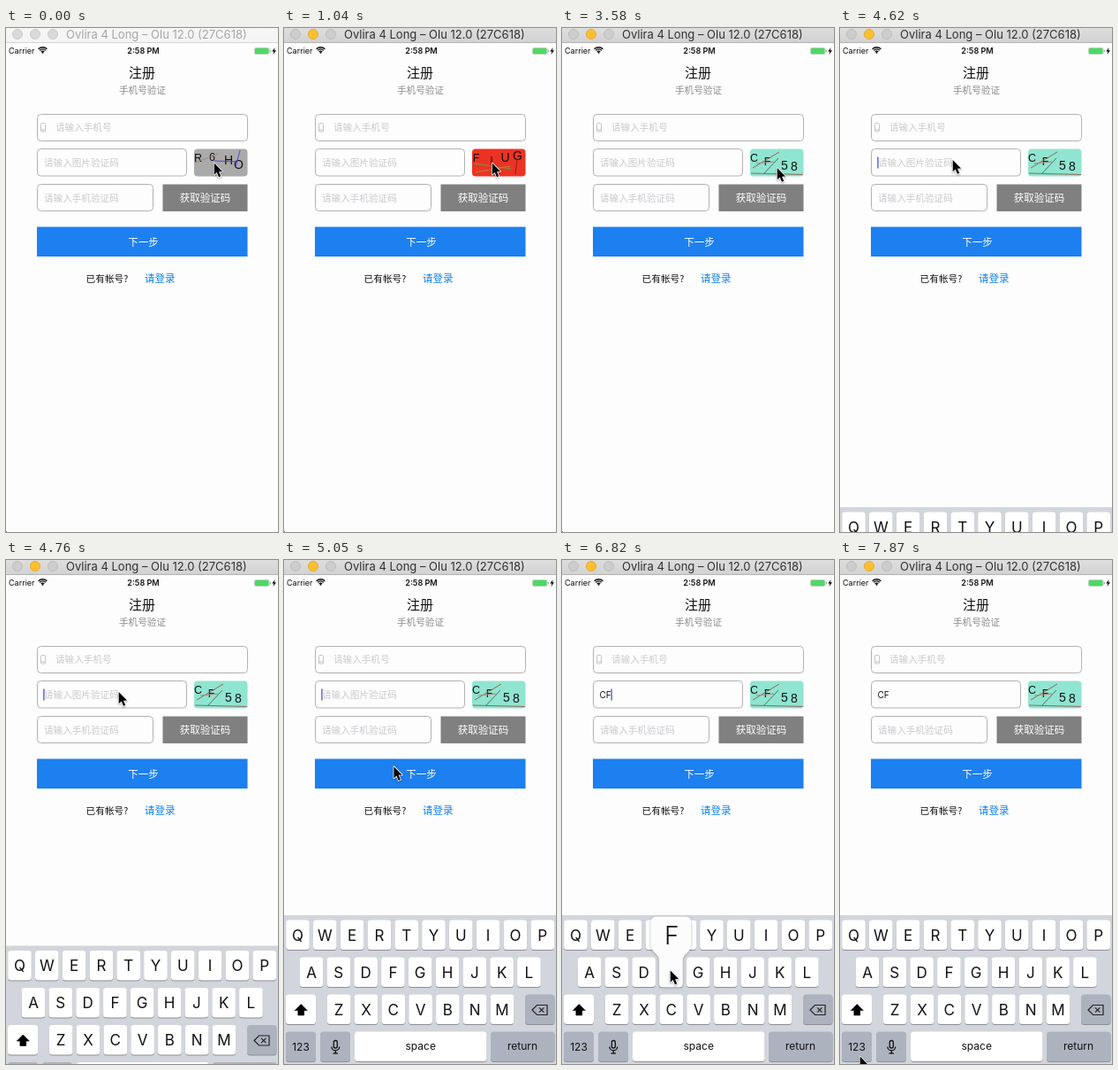
An HTML page with a canvas for the animation above (8 s loop, 308x569 px).

```html
<!DOCTYPE html>
<html lang="zh-CN">
<head>
<meta charset="utf-8">
<title>注册</title>
<style>
html, body { margin: 0; width: 100%; height: 100%; overflow: hidden; background: #fdfdfd; }
canvas { display: block; width: 308px; height: 569px; }
</style>
</head>
<body>
<canvas id="stage"></canvas>
<script>
const W = 308, H = 569, LOOP = 8000;
const LATIN = 'Inter, "Liberation Sans", sans-serif';
const HAN = '"Noto Sans CJK SC", "Noto Sans CJK", sans-serif';
const GLYPH = '"Liberation Sans", Arial, sans-serif';

const canvas = document.getElementById('stage');
const ctx = canvas.getContext('2d');
const dpr = window.devicePixelRatio || 1;
canvas.width = W * dpr;
canvas.height = H * dpr;

// ---------- helpers ----------
function text(str, x, y, size, color, family = LATIN, align = 'left', weight = 400) {
  ctx.font = `${weight} ${size}px ${family}`;
  ctx.textAlign = align;
  ctx.fillStyle = color;
  ctx.fillText(str, x, y);
}

function box(x, y, w, h, r, fill, stroke, width = 1) {
  ctx.beginPath();
  ctx.roundRect(x, y, w, h, r);
  if (fill) { ctx.fillStyle = fill; ctx.fill(); }
  if (stroke) { ctx.strokeStyle = stroke; ctx.lineWidth = width; ctx.stroke(); }
}

function poly(points, fill, stroke, width = 1) {
  ctx.beginPath();
  points.forEach(([x, y]) => ctx.lineTo(x, y));
  ctx.closePath();
  if (stroke) { ctx.strokeStyle = stroke; ctx.lineWidth = width; ctx.stroke(); }
  if (fill) { ctx.fillStyle = fill; ctx.fill(); }
}

function line(x1, y1, x2, y2, color, width = 1) {
  ctx.strokeStyle = color;
  ctx.lineWidth = width;
  ctx.beginPath();
  ctx.moveTo(x1, y1);
  ctx.lineTo(x2, y2);
  ctx.stroke();
}

const within = (t, a, b) => t >= a && t < b;

// ---------- window and status bar ----------
function titleBar(active) {
  const g = ctx.createLinearGradient(0, 0, 0, 16);
  g.addColorStop(0, active ? '#dedede' : '#f6f6f6');
  g.addColorStop(1, active ? '#d2d2d2' : '#f4f4f4');
  ctx.fillStyle = g;
  ctx.fillRect(0, 0, W, 16);
  ctx.fillStyle = active ? '#b4b4b4' : '#d4d4d4';
  ctx.fillRect(0, 16, W, 1);
  [13, 33, 53].forEach((x, i) => {
    const lit = active && i === 1;
    box(x - 5.5, 1.5, 11, 11, 5.5,
      lit ? '#fdbf2f' : active ? '#cdcdcd' : '#d9d9d9',
      lit ? '#e6ac30' : active ? '#bebebe' : '#cccccc');
  });
  text('Ovlira 4 Long – Olu 12.0 (27C618)', 68, 12, 13, active ? '#303030' : '#a6a6a6');
}

function statusBar() {
  text('Carrier', 3, 29, 9, '#111');
  ctx.strokeStyle = '#111';
  ctx.lineWidth = 1.4;
  [2.6, 5, 7.2].forEach(r => {
    ctx.beginPath();
    ctx.arc(41.5, 29, r, -Math.PI * 0.74, -Math.PI * 0.26);
    ctx.stroke();
  });
  box(40.6, 27, 1.8, 1.8, 0.9, '#111');
  text('2:58 PM', 155.5, 29, 9.1, '#111', LATIN, 'center', 600);
  box(281.5, 22.5, 16.5, 7, 1.5, null, '#b9cdbb');
  box(282, 23, 15.5, 6, 1, '#4cd964');
  ctx.fillStyle = '#9a9a9a';
  ctx.fillRect(298.8, 24.7, 1, 2.6);
  poly([[304.6, 22], [301.2, 26.6], [303.2, 26.6], [302.4, 30], [306, 25.2], [303.9, 25.2]], '#111');
}

// ---------- form ----------
function form(value, caret) {
  const edge = '#b2b2b2', hint = '#c9c9ce';
  text('注册', 154, 56, 15, '#111', HAN, 'center');
  text('手机号验证', 154.5, 74, 10.6, '#8a8a8a', HAN, 'center');

  box(35.5, 97.5, 238, 30, 4, '#fdfdfd', edge);
  box(35.5, 136.5, 169, 30.5, 4, '#fdfdfd', edge);
  box(35.5, 176.5, 131, 30, 4, '#fdfdfd', edge);
  box(39.5, 107.5, 5, 9.5, 1, null, '#c4c4c4');
  line(39.5, 115, 44.5, 115, '#c4c4c4');

  text('请输入手机号', 56, 116, 10.6, hint, HAN);
  text('请输入手机验证码', 43, 195.5, 10.6, hint, HAN);
  if (value) text(value, 42.4, 156, 10, '#111');
  else text('请输入图片验证码', 43, 156, 10.6, hint, HAN);
  if (caret) {
    ctx.font = `400 10px ${LATIN}`;
    ctx.fillStyle = '#4a62e0';
    ctx.fillRect(42.2 + ctx.measureText(value).width, 145.5, 1.4, 13);
  }

  box(177.5, 176.5, 96, 30.5, 0, '#808080');
  text('获取验证码', 225.5, 196, 11.5, '#fff', HAN, 'center');
  box(35, 224.5, 238.5, 33.5, 0, '#1d80f0');
  text('下一步', 155.5, 245.7, 11.5, '#fff', HAN, 'center');
  text('已有帐号?', 90.5, 287, 10.7, '#111', HAN);
  text('请登录', 157, 287, 11.5, '#0b80f2', HAN);
}

// ---------- captcha: glyphs as [char, centre x, baseline], lines as [x1, y1, x2, y2, colour] ----------
const captchas = [
  { at: 0, bg: '#aaaaaa',
    glyphs: [['R', 217.5, 151], ['6', 233.5, 150], ['H', 252, 154], ['O', 263.5, 159]],
    lines: [[214, 152, 240, 142, '#a08a70'], [236, 150, 262, 151, '#6a3fc0'], [265, 138, 260, 157, '#4a50d8']] },
  { at: 150, bg: '#c9b26a',
    glyphs: [['K', 218, 152], ['3', 234, 149], ['N', 250, 152], ['T', 264, 156]],
    lines: [[216, 160, 250, 147, '#56743c'], [222, 143, 266, 158, '#7a4a30']] },
  { at: 1040, bg: '#ec3323',
    glyphs: [['F', 217.5, 151], ['I', 235, 154], ['U', 250.5, 151], ['G', 264.5, 149]],
    lines: [[215, 153, 257, 159, '#6f9a3c'], [217, 163, 256, 156, '#b08a3c'], [264, 148, 262, 165, '#8c2020']] },
  { at: 1640, bg: '#9fb4e2',
    glyphs: [['7', 217.5, 150], ['P', 233, 152], ['E', 250, 156], ['2', 264, 151]],
    lines: [[215, 146, 258, 160, '#5a3f80'], [224, 163, 270, 145, '#497a60']] },
  { at: 2390, bg: '#90e5d0',
    glyphs: [['C', 217.5, 150.5], ['F', 232.5, 154.5], ['5', 251.8, 159.5], ['8', 262.8, 160.5]],
    lines: [[216, 158, 246, 140, '#8a6a58'], [228, 165, 245, 147, '#4f6f68'],
            [214, 164, 273, 165.5, '#8a6a58'], [220, 153, 240, 151, '#b08678']] }
];

function captcha(t) {
  const c = captchas.filter(k => t >= k.at).pop();
  box(213, 136.5, 60.5, 31, 4, c.bg);
  c.glyphs.forEach(([ch, x, y], i) => text(ch, x, y, i < 2 ? 12.5 : 14, '#111', GLYPH, 'center'));
  c.lines.forEach(l => line(...l));
}

// ---------- keyboard ----------
const PITCH = 30.8;
const rows = [['QWERTYUIOP', 15.5, 406.5], ['ASDFGHJKL', 31, 448.5], ['ZXCVBNM', 62.2, 490.5]];

function key(x, y, w, fill = '#fff') {
  box(x, y + 1, w, 33.5, 3.5, '#8b8e94');
  box(x, y, w, 33.5, 3.5, fill);
}

function keyboard(shift, pressed) {
  const dark = '#adb3be';
  ctx.save();
  ctx.translate(0, shift);
  ctx.fillStyle = '#d2d5db';
  ctx.fillRect(0, 401, W, H - 401);
  let hit = null;
  rows.forEach(([letters, x0, y]) => [...letters].forEach((ch, i) => {
    const x = x0 + i * PITCH;
    key(x - 13.3, y, 26.6);
    text(ch, x, y + 23.2, 17, '#111', LATIN, 'center');
    if (ch === pressed) hit = [x, y];
  }));

  key(2, 490.5, 34);
  poly([[19.3, 501.5], [26.3, 508.6], [22.7, 508.6], [22.7, 514], [15.9, 514], [15.9, 508.6], [12.3, 508.6]],
    '#000', '#000', 0.6);

  key(273, 490.5, 33.5, dark);
  poly([[281, 508], [286.5, 502.5], [298, 502.5], [298, 513.5], [286.5, 513.5]], null, '#222', 1.2);
  line(289, 505.3, 294.4, 510.7, '#222', 1.2);
  line(294.4, 505.3, 289, 510.7, '#222', 1.2);

  key(2, 532.5, 34, dark);
  text('123', 19, 553.5, 12, '#111', LATIN, 'center');
  key(41, 532.5, 34, dark);
  box(56.3, 542.5, 4, 8.5, 2, null, '#111', 1.3);
  ctx.beginPath();
  ctx.arc(58.3, 549.5, 4.4, 0, Math.PI);
  ctx.stroke();
  line(58.3, 554, 58.3, 557, '#111', 1.3);
  line(55.5, 557, 61, 557, '#111', 1.3);
  key(80, 532.5, 149.5);
  text('space', 154.7, 552.7, 12, '#111', LATIN, 'center');
  key(234, 532.5, 72.5, dark);
  text('return', 270, 552.7, 12, '#111', LATIN, 'center');

  if (hit) popup(pressed, ...hit);
  ctx.restore();
}

function popup(ch, x, y) {
  const l = x - 23, r = x + 23, kl = x - 13.3, kr = x + 13.3, top = y - 46;
  ctx.save();
  ctx.shadowColor = 'rgba(0,0,0,0.3)';
  ctx.shadowBlur = 3 * dpr;
  ctx.shadowOffsetY = 0.5 * dpr;
  ctx.beginPath();
  ctx.moveTo(l + 6, top);
  ctx.arcTo(r, top, r, top + 6, 6);
  ctx.lineTo(r, top + 32);
  ctx.bezierCurveTo(r, top + 41, kr, top + 41, kr, top + 50);
  ctx.arcTo(kr, y + 34, kr - 4, y + 34, 4);
  ctx.arcTo(kl, y + 34, kl, y + 30, 4);
  ctx.lineTo(kl, top + 50);
  ctx.bezierCurveTo(kl, top + 41, l, top + 41, l, top + 32);
  ctx.arcTo(l, top, l + 6, top, 6);
  ctx.closePath();
  ctx.fillStyle = '#fcfcfc';
  ctx.fill();
  ctx.restore();
  text(ch, x + 0.8, top + 31, 28, '#111', LATIN, 'center', 300);
}

// ---------- pointer: [start, last step, step count, x, y] ----------
const moves = [
  [2840, 2840, 1, 243, 159],
  [3140, 3280, 2, 242.6, 158.6],
  [3580, 3580, 1, 243.5, 157.5],
  [3720, 4020, 3, 127.5, 148.5],
  [4900, 5640, 6, 114.8, 473],
  [5790, 5940, 2, 122, 501],
  [6230, 6380, 2, 122.5, 465],
  [6820, 6820, 1, 122.5, 463],
  [6970, 7720, 6, 25.5, 561],
  [7870, 7870, 1, 22.5, 560]
];

function pointerAt(t) {
  let x = 235.5, y = 152;
  for (const [start, last, n, tx, ty] of moves) {
    if (t < start) break;
    const gap = n > 1 ? (last - start) / (n - 1) : 1;
    const k = Math.min(n, Math.floor((t - start + 12) / gap) + 1) / n;
    const e = n > 2 ? k * k * (3 - 2 * k) : k;
    x += (tx - x) * e;
    y += (ty - y) * e;
  }
  return [x, y];
}

function pointer(x, y) {
  const arrow = [[0, 0], [0, 14.6], [3.3, 11.5], [5.8, 17.4], [8.3, 16.3], [5.8, 10.6], [10.3, 10.5]];
  ctx.save();
  ctx.translate(x + 0.2, y + 0.5);
  ctx.scale(0.91, 0.91);
  ctx.lineJoin = 'round';
  ctx.shadowColor = 'rgba(0,0,0,0.35)';
  ctx.shadowBlur = 2 * dpr;
  ctx.shadowOffsetY = dpr;
  poly(arrow, null, '#fff', 1.8);
  ctx.shadowColor = 'transparent';
  poly(arrow, '#000');
  ctx.restore();
}

// ---------- scene ----------
function draw(t) {
  ctx.setTransform(dpr, 0, 0, dpr, 0, 0);
  ctx.fillStyle = '#fdfdfd';
  ctx.fillRect(0, 0, W, H);
  ctx.fillStyle = '#777';
  ctx.fillRect(0, 568, 1, 1);

  titleBar(t >= 150);
  statusBar();
  const value = t >= 6820 ? 'CF' : t >= 5940 ? 'C' : '';
  form(value, within(t, 4620, 5350) || within(t, 5790, 7420));
  captcha(t);

  if (t >= 4620) {
    const shift = t < 4760 ? 140 : t < 4900 ? 34.5 : 0;
    const pressed = within(t, 5940, 6090) ? 'C' : within(t, 6820, 6970) ? 'F' : '';
    keyboard(shift, pressed);
  }
  pointer(...pointerAt(t));
}

const began = performance.now();
function tick() {
  draw((performance.now() - began) % LOOP);
  requestAnimationFrame(tick);
}
tick();
</script>
</body>
</html>
```
